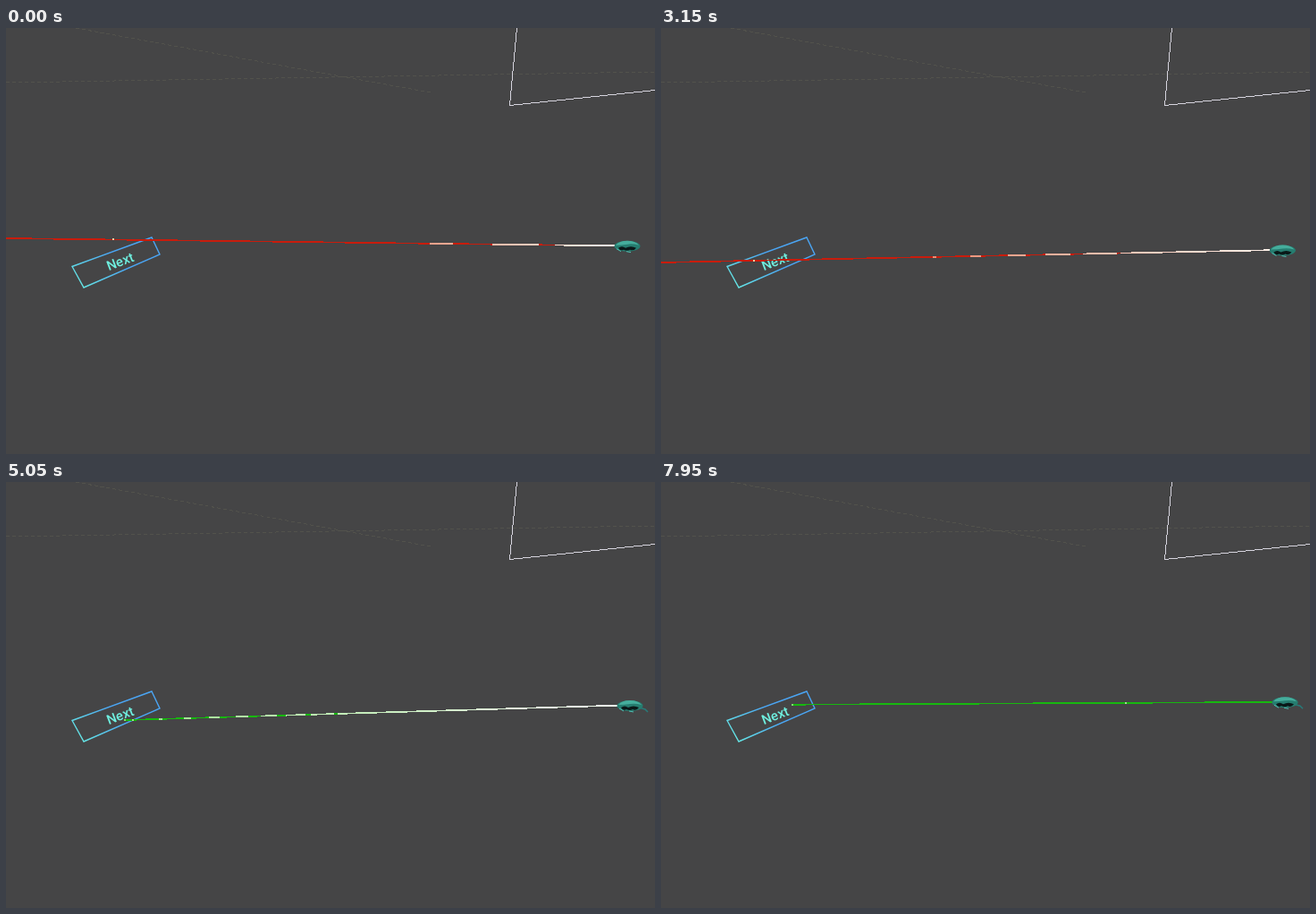
An HTML page that plays this animation: 726x476 px, repeating every 8000 ms.

```html
<!DOCTYPE html>
<html lang="en">
<head>
<meta charset="utf-8">
<title>Laser pointer and button</title>
<style>
html, body { margin: 0; width: 100%; height: 100%; overflow: hidden; background: #454546; }
svg { display: block; width: 100%; height: 100%; }
text { font: 500 15px Roboto, sans-serif; }
</style>
</head>
<body>
<svg viewBox="0 0 726 476" fill="none">
  <defs>
    <linearGradient id="glow" gradientUnits="userSpaceOnUse" x2="684">
      <stop id="near" offset="0"/>
      <stop id="far" offset="1"/>
    </linearGradient>
    <linearGradient id="edge" gradientUnits="userSpaceOnUse" x1="76" y1="282" x2="110" y2="244">
      <stop offset="0" stop-color="#65e6e4"/>
      <stop offset="1" stop-color="#4aa5f4"/>
    </linearGradient>
  </defs>

  <g shape-rendering="crispEdges">
    <path d="M78 0L363 52L475 72M0 61L726 49" stroke="#5c5c50" stroke-dasharray="4 3" opacity=".6"/>
    <path d="M571.5 0L563.5 86.5L726 69.5" stroke="#d6d4de"/>
  </g>

  <g id="button">
    <path d="M163 234L172 253L87 290L74 266.5Z" stroke="url(#edge)" stroke-width="1.4"/>
    <text transform="translate(129.5 265.7) rotate(-21)" text-anchor="middle" fill="#6ff0e0">Next</text>
  </g>
  <g id="dust" shape-rendering="crispEdges"></g>

  <g shape-rendering="crispEdges">
    <path id="beam" stroke-width="1.7"/>
    <path id="dashes" stroke="url(#glow)" stroke-width="1.7"/>
    <rect id="dot" width="2" height="2"/>
  </g>

  <g id="pointer">
    <path id="tail" d="M10 2L17 4L20 7" stroke="#287a78" stroke-width="1.5"/>
    <ellipse rx="14.5" ry="6" fill="#267d70"/>
    <path d="M-13 -1Q-9 -6 0 -6T13 -1Q6 -3 0 -2T-13 -1" fill="#45ad9c"/>
    <path d="M-10 2Q-6 -1 -2 2Q4 -1 10 2Q7 6 3 4Q0 6 -4 4Q-8 6 -10 2" fill="#0a1818"/>
    <path d="M-12 3L-7 6M-1 6L4 7" stroke="#4fc0b4"/>
  </g>
</svg>
<script>
const LOOP = 8000, STEP = 50;
const el = id => document.getElementById(id);
const set = (node, attrs) => { for (const k in attrs) node.setAttribute(k, attrs[k]); };
const lerp = (a, b, p) => a + (b - a) * p;
const clamp = v => Math.min(1, Math.max(0, v));
const smooth = v => (v = clamp(v)) * v * (3 - 2 * v);

// turning points of the hand: time, beam height at the left border
const aim = [
  [900, 235], [1350, 233], [1650, 228], [1950, 268], [2350, 220], [2550, 220],
  [3150, 262], [3450, 346], [3800, 220], [4200, 257], [5050, 270],
  [5950, 230], [6350, 246], [6750, 249.5]
];

const rate = i => (aim[i + 1][1] - aim[i][1]) / (aim[i + 1][0] - aim[i][0]);

// velocity at a point: zero wherever the hand turns or rests
function velocity(i) {
  if (i === 0 || i === aim.length - 1) return 0;
  const a = rate(i - 1), b = rate(i);
  return a * b > 0 ? 2 * a * b / (a + b) : 0;
}

function aimAt(t) {
  const i = aim.findIndex(k => k[0] > t) - 1;
  if (i === -1) return aim[0][1];
  if (i < 0) return aim[aim.length - 1][1];
  const [t0, y0] = aim[i], [t1, y1] = aim[i + 1];
  const span = t1 - t0, p = (t - t0) / span, q = 1 - p;
  return lerp(y0, y1, smooth(p)) + span * p * q * (velocity(i) * q - velocity(i + 1) * p);
}

const bump = (t, start, peak, end) =>
  t < peak ? smooth((t - start) / (peak - start)) : smooth((end - t) / (end - peak));
const burst = t => bump(t, 3900, 4400, 5050) + bump(t, 6200, 6800, 7930);
const isHit = t => (t >= 3900 && t < 5950) || t >= 6200;

let seed = 17;
function rand() {
  seed = (seed * 16807) % 2147483647;
  return seed / 2147483647;
}
const spread = () => rand() + rand() - 1;

const corners = [[163, 234], [172, 253], [87, 290], [74, 266.5]];
const sides = [0.1, 0.5, 0.61, 1];
const colors = ["#3f8ef8", "#50c4f4", "#66f0e6"];
const layers = colors.map(fill => {
  const node = document.createElementNS("http://www.w3.org/2000/svg", "path");
  set(node, { fill });
  el("dust").append(node);
  return node;
});

function makeGrain(_, i) {
  const angle = rand() * Math.PI * 2, reach = 21 * rand() ** 2;
  const dx = Math.cos(angle) * reach, dy = Math.sin(angle) * reach;
  if (i % 3 === 0) {
    const u = spread() * 17, v = spread() * 8;
    return { dx, dy, x: 127.5 + u * 0.93 + v * 0.36, y: 260.5 - u * 0.36 + v * 0.93, layer: 2 };
  }
  const r = rand(), s = sides.findIndex(v => r < v), p = rand();
  const a = corners[s], b = corners[(s + 1) % 4];
  const layer = reach > 7 ? 1 + Math.floor(rand() * 2) : Math.floor(rand() * 2);
  return { dx, dy, x: lerp(a[0], b[0], p), y: lerp(a[1], b[1], p), layer };
}
const grains = Array.from({ length: 1300 }, makeGrain);

function drawDust(amount) {
  el("button").setAttribute("opacity", clamp(1 - amount * 4));
  el("dust").setAttribute("opacity", clamp(amount * 6));
  const paths = colors.map(() => "");
  if (amount > 0) {
    for (const g of grains) {
      const x = Math.round(g.x + g.dx * amount), y = Math.round(g.y + g.dy * amount);
      paths[g.layer] += `M${x} ${y}h1v1h-1z`;
    }
  }
  layers.forEach((node, i) => set(node, { d: paths[i] }));
}

function drawBeam(t) {
  const hit = isHit(t), y0 = aimAt(t);
  const handX = 681 + 3 * smooth((t - 2800) / 1500);
  const handY = 243 + (y0 - 233) * 0.18;
  const slope = (handY - y0) / handX, steep = Math.abs(slope);
  const yAt = x => y0 + slope * x;
  const dotX = hit ? 147 - (y0 - 250) * 0.7 : 120 - (y0 - 235) * 0.6;
  const left = hit ? dotX : 0;
  const from = Math.max(100, 600 - 16000 * steep);
  const period = Math.min(260, 0.85 / Math.max(0.001, steep));

  set(el("beam"), {
    d: `M${left} ${yAt(left)}L${handX} ${handY}`,
    stroke: hit ? "#17b80f" : "#c91c0c"
  });

  // pale dashes grow longer towards the hand until they join
  let d = "", on = false;
  for (let x = Math.max(left, from); x < handX; x += 2) {
    const phase = ((x - handX) / period % 1 + 1) % 1;
    const lit = phase < clamp((x - from) / 250);
    if (lit) d += (on ? "L" : "M") + x + " " + yAt(x);
    on = lit;
  }
  if (on) d += `L${handX} ${handY}`;
  set(el("dashes"), { d });
  set(el("glow"), { x1: from });
  set(el("near"), { "stop-color": hit ? "#9be08c" : "#ee8468" });
  set(el("far"), { "stop-color": hit ? "#f2faee" : "#fff2ea" });
  set(el("dot"), { x: dotX - 1, y: yAt(dotX) - 1, fill: hit ? "#7be06a" : "#f0d0a0" });
  set(el("pointer"), { transform: `translate(${handX + 14} ${handY + 0.3})` });
  set(el("tail"), { opacity: smooth((t - 3150) / 500) });
}

function draw(now) {
  const t = Math.floor(now % LOOP / STEP) * STEP;
  drawDust(burst(t));
  drawBeam(t);
}

const begin = performance.now();
function tick() {
  draw(performance.now() - begin);
  requestAnimationFrame(tick);
}
tick();
</script>
</body>
</html>
```
